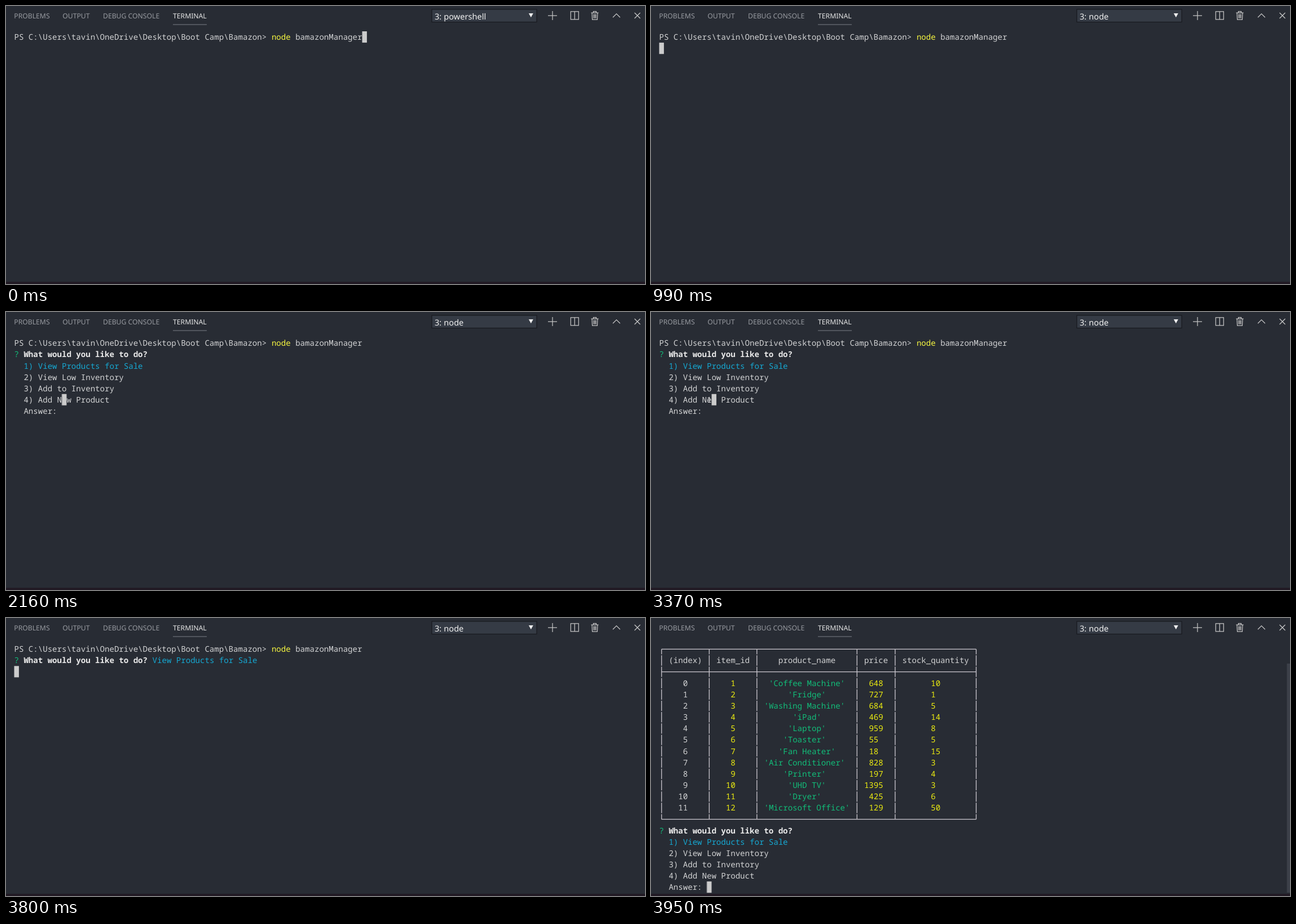
These frames come from a looping animation (1133 by 494 pixels, 5740 ms). An HTML page:

```html
<!DOCTYPE html>
<html lang="en">
<head>
<meta charset="utf-8">
<title>Terminal</title>
<style>
  html, body { margin: 0; width: 100%; height: 100%; overflow: hidden; background: #282c34; }
  svg { display: block; width: 100vw; height: 100vh; }
  text { white-space: pre; text-rendering: geometricPrecision; }
  #term text { font: 14.087px "Noto Sans Mono", "DejaVu Sans Mono", monospace; fill: #d2d3d4; }
  #term .bold { font-weight: 700; fill: #eaeaea; }
  #term .cmd { fill: #f8f840; }
  #term .num { fill: #ecec10; }
  #term .green { fill: #12bd79; }
  #term .cyan { fill: #16a8d2; }
  .tabs { font: 12.2px "Noto Sans", "Open Sans", sans-serif; fill: #989ba1; }
  .tabs .on { fill: #e7e7e7; }
  .shell { font: 14.6px "Noto Sans", "Open Sans", sans-serif; fill: #f0f0f0; }
  .icons { fill: none; stroke: #c5c5c5; stroke-width: 1.25; }
  .grid { fill: none; stroke: #ccc8d0; stroke-width: 1.3; }

  .anim { animation: 5740ms step-end infinite; }
  #ps { animation-name: ps; }
  #node { animation-name: node; }
  #head { animation-name: head; }
  #menu { animation-name: menu; }
  #digit { animation-name: digit; }
  #reply { animation-name: reply; }
  #table { animation-name: table; }
  #again { animation-name: again; }
  #cursor { animation-name: cursor; }

  @keyframes ps { 0% { visibility: visible } 17.24%, 100% { visibility: hidden } }
  @keyframes node { 0% { visibility: hidden } 17.24%, 100% { visibility: visible } }
  @keyframes head { 0% { visibility: visible } 68.81%, 100% { visibility: hidden } }
  @keyframes menu {
    0%, 56.62% { visibility: hidden }
    37.63%, 58.71% { visibility: visible }
    66.2%, 100% { visibility: hidden }
  }
  @keyframes digit { 0% { visibility: hidden } 58.71% { visibility: visible } 66.2%, 100% { visibility: hidden } }
  @keyframes reply { 0% { visibility: hidden } 66.2% { visibility: visible } 68.81%, 100% { visibility: hidden } }
  @keyframes table {
    0% { visibility: hidden; transform: translate(0, 40.3px) }
    67.77% { visibility: visible; transform: translate(0, 40.3px) }
    68.81%, 100% { visibility: visible; transform: none }
  }
  @keyframes again { 0% { visibility: hidden } 68.81%, 100% { visibility: visible } }
  @keyframes cursor {
    0% { transform: translate(617px, 0) }
    11.49%, 56.62% { transform: translate(0, 20.15px) }
    37.63% { transform: translate(84.5px, 100.75px) }
    58.71% { transform: translate(93px, 100.75px) }
    66.2% { transform: translate(0, 40.3px) }
    67.77% { transform: translate(0, 362.7px) }
    68.81%, 100% { transform: translate(84.5px, 423.15px) }
  }
</style>
</head>
<body>
<svg viewBox="0 0 1133 494">
  <rect width="1133" height="494" fill="#282c34"/>
  <rect y="490" width="1133" height="4" fill="#211a24"/>

  <g class="tabs">
    <text x="14.3" y="21.9">PROBLEMS</text>
    <text x="100.3" y="21.9">OUTPUT</text>
    <text x="172" y="21.9">DEBUG CONSOLE</text>
    <text x="296" y="21.9" class="on">TERMINAL</text>
  </g>
  <rect x="296" y="32.5" width="60" height="1" fill="#7b7f86"/>

  <rect x="755" y="6" width="186" height="22.5" fill="#353b45" stroke="#181a1f" stroke-width="1.2"/>
  <g class="shell">
    <text x="760" y="23.7">3: </text>
    <text id="ps" class="anim" x="776.3" y="23.7">powershell</text>
    <text id="node" class="anim" x="776.3" y="23.7">node</text>
  </g>
  <path d="M926.8 13h8l-4 7.2z" fill="#f0f0f0"/>

  <g class="icons">
    <path d="M961 17h16M969 9v16"/>
    <path d="M1001.3 9.8h14v14h-14zM1008.3 9.8v14"/>
    <path d="M1037.5 12h13M1041.5 12v-2.4h5V12M1039 12l.6 12.2h8.8l.6-12.2M1042 14.5v7.3M1044 14.5v7.3M1046 14.5v7.3"/>
    <path d="M1076 20.2l6.4-6.4 6.4 6.4"/>
    <path d="M1114.5 12l10 10M1124.5 12l-10 10"/>
  </g>

  <g id="term">
    <g id="head" class="anim"></g>
    <g id="menu" class="anim"></g>
    <g id="digit" class="anim"></g>
    <g id="reply" class="anim"></g>
    <g id="table" class="anim"></g>
    <g id="again" class="anim">
      <rect x="1127.5" y="81" width="5.5" height="407" fill="#3c4049"/>
    </g>
    <rect id="cursor" class="anim" x="14.5" y="45" width="8.4" height="20.1" fill="#cccccc"/>
  </g>
</svg>
<script>
  const NS = 'http://www.w3.org/2000/svg';
  const CELL = 8.452, ROW = 20.15, LEFT = 14.5, TOP = 45;

  function add(id, tag, attrs) {
    const el = document.createElementNS(NS, tag);
    for (const key in attrs) el.setAttribute(key, attrs[key]);
    return document.getElementById(id).appendChild(el);
  }

  function put(id, col, row, str, cls = '') {
    add(id, 'text', { x: LEFT + col * CELL, y: TOP + 15.2 + row * ROW, class: cls }).textContent = str;
  }

  function ask(id, row) {
    put(id, 0, row, '?', 'green');
    put(id, 2, row, 'What would you like to do?', 'bold');
  }

  function menu(id, row) {
    ask(id, row);
    ['View Products for Sale', 'View Low Inventory', 'Add to Inventory', 'Add New Product']
      .forEach((label, i) => put(id, 2, row + 1 + i, `${i + 1}) ${label}`, i ? '' : 'cyan'));
    put(id, 2, row + 5, 'Answer:');
  }

  put('head', 0, 0, 'PS C:\\Users\\tavin\\OneDrive\\Desktop\\Boot Camp\\Bamazon>');
  put('head', 54, 0, 'node', 'cmd');
  put('head', 59, 0, 'bamazonManager');
  menu('menu', 1);
  put('digit', 10, 5, '1');
  ask('reply', 1);
  put('reply', 29, 1, 'View Products for Sale', 'cyan');
  menu('again', 16);

  // Table cells are centred between the column rules.
  const rules = [0, 10, 20, 41, 49, 66];
  const styles = ['', 'num', 'green', 'num', 'num'];
  const items = [
    ['Coffee Machine', 648, 10], ['Fridge', 727, 1], ['Washing Machine', 684, 5],
    ['iPad', 469, 14], ['Laptop', 959, 8], ['Toaster', 55, 5],
    ['Fan Heater', 18, 15], ['Air Conditioner', 828, 3], ['Printer', 197, 4],
    ['UHD TV', 1395, 3], ['Dryer', 425, 6], ['Microsoft Office', 129, 50]
  ];

  function line(row, cells, classes) {
    cells.forEach((cell, i) => {
      const str = String(cell), room = rules[i + 1] - rules[i] - 1;
      put('table', rules[i] + 1 + Math.floor((room - str.length) / 2), row, str, classes[i]);
    });
  }

  line(1, ['(index)', 'item_id', 'product_name', 'price', 'stock_quantity'], []);
  items.forEach(([name, price, stock], i) =>
    line(i + 3, [i, i + 1, `'${name}'`, price, stock], styles));

  const midX = col => LEFT + (col + 0.5) * CELL;
  const midY = row => TOP + (row + 0.5) * ROW + 0.3;
  for (const row of [0, 2, 15])
    add('table', 'path', { class: 'grid', d: `M${midX(0)} ${midY(row)}H${midX(66)}` });
  for (const col of rules)
    add('table', 'path', {
      class: 'grid', d: `M${midX(col)} ${midY(0)}V${midY(15)}`,
      'stroke-dasharray': `18.35 ${ROW - 18.35}`, 'stroke-dashoffset': 9.2
    });
</script>
</body>
</html>
```
